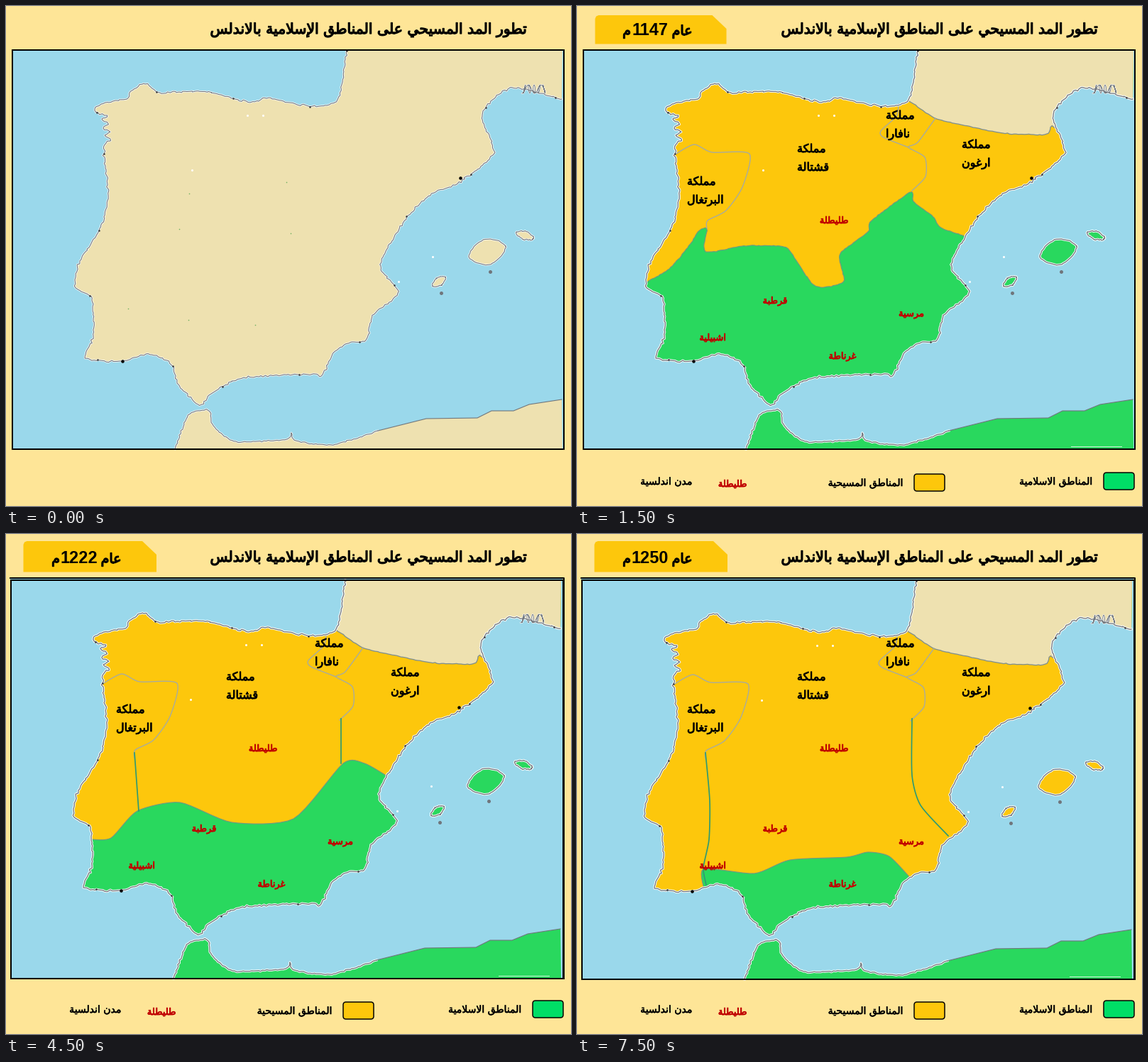
A matplotlib script that plays this animation: 796x704 px, repeating every 8000 ms.

```python
import numpy as np
import matplotlib.pyplot as plt
from matplotlib.animation import FuncAnimation
from matplotlib.patches import FancyBboxPatch, Polygon, Rectangle
from matplotlib.patheffects import withStroke

W, H, DPI = 796, 704, 100
PX = 72 / DPI
PAPER, SEA, SAND = "#fee597", "#9ad8eb", "#eee1b0"
GOLD, GREEN, RED = "#fdc70c", "#29d85e", "#c00000"
GREY, TEAL = "#70767c", "#2f9a72"

# Arabic shaping: isolated, final, initial and medial glyphs follow each other.
RIGHT_ONLY = "اةدذرزوى"
GLYPHS, code = {}, 0xFE8D
for letter in "ابةتثجحخدذرزسشصضطظعغفقكلمنهوىي":
    GLYPHS[letter] = code
    code += 2 if letter in RIGHT_ONLY else 4
GLYPHS.update({"\ufef9": 0xFEF9, "\ufefb": 0xFEFB})
RIGHT_ONLY += "\ufef9\ufefb"


def arabic(text):
    text = text.replace("لإ", "\ufef9").replace("لا", "\ufefb")
    out = []
    for i, c in enumerate(text):
        if c not in GLYPHS:
            out.append(c)
            continue
        before, after = text[max(i - 1, 0):i], text[i + 1:i + 2]
        joins_before = before in GLYPHS and before not in RIGHT_ONLY
        joins_after = after in GLYPHS and c not in RIGHT_ONLY
        out.append(chr(GLYPHS[c] + joins_before + 2 * joins_after))
    return "".join(reversed(out))


rng = np.random.default_rng(4)


def smooth(points, tension=0.35, steps=8):
    """Hermite curve through a few key points."""
    p = np.array(points, float)
    p = np.vstack([p[0], p, p[-1]])
    t = np.arange(steps)[:, None] / steps
    out = []
    for a, b, c, d in zip(p[:-3], p[1:-2], p[2:-1], p[3:]):
        start, end = tension * (c - a), tension * (d - b)
        out.append(b + t * start + t**2 * (3 * (c - b) - 2 * start - end)
                   + t**3 * (2 * (b - c) + start + end))
    return np.vstack(out + [p[-1:]])


def rough(points, amount=0.7):
    """Smooth curve, resampled every few pixels, with small irregularities."""
    p = smooth(points)
    length = np.r_[0, np.cumsum(np.hypot(*np.diff(p, axis=0).T))]
    at = np.linspace(0, length[-1], int(length[-1] / 3))
    line = np.c_[np.interp(at, length, p[:, 0]), np.interp(at, length, p[:, 1])]
    line[1:-1] += rng.normal(0, amount, line[1:-1].shape)
    return line


def island(x, y, rx, ry, tilt):
    """Tilted, slightly pointed ellipse."""
    a = np.linspace(0, 2 * np.pi, 40)
    u = rx * np.cos(a) * np.abs(np.cos(a)) ** 0.3
    v = ry * np.sin(a) * np.abs(np.sin(a)) ** 0.3
    c, s = np.cos(tilt), np.sin(tilt)
    shore = np.c_[x + c * u - s * v, y + s * u + c * v]
    shore[1:-1] += rng.normal(0, 0.5, (38, 2))
    return shore


NORTH = [(480, 63), (475, 100), (467, 133), (440, 141), (402, 137), (370, 129),
         (340, 135), (279, 120), (217, 122), (196, 109), (173, 122), (171, 130),
         (134, 138), (124, 148)]
INLETS = [(138 + i + 5 * (-1) ** i, 155 + 5.5 * i) for i in range(8)]
WEST = [(138, 205), (144, 270), (131, 318), (104, 358), (97, 394), (107, 402),
        (121, 412), (123, 465), (112, 495)]
SOUTH = [(163, 500), (200, 490), (232, 503), (244, 535), (273, 562), (290, 545),
         (333, 524), (432, 518), (444, 522), (462, 488), (485, 474), (508, 471)]
EAST = [(517, 435), (553, 404), (527, 368), (545, 328), (575, 286), (605, 261),
        (637, 250), (684, 212), (684, 190), (672, 165), (674, 145), (712, 115),
        (783, 131)]
COAST = rough(NORTH + INLETS + WEST + SOUTH + EAST)
AFRICA_WEST = rough([(238, 624), (257, 576), (286, 569), (290, 588), (309, 607),
                     (330, 614), (395, 610), (402, 600), (408, 612), (460, 618),
                     (524, 598)], 0.5)
AFRICA_EAST = np.array([(524, 598), (592, 581), (664, 580), (684, 570), (715, 570),
                        (737, 561), (783, 554)])
ISLANDS = [island(678, 346, 27, 18, -0.3), island(731, 323, 13, 6, 0.3),
           island(610, 388, 11, 6, -0.6)]

PYRENEES = rough([(467, 133), (505, 158), (555, 170), (600, 179), (660, 181),
                  (668, 169), (674, 172)], 0.3)
PORTUGAL = smooth([(138, 209), (165, 195), (190, 206), (243, 208), (233, 255),
                   (210, 288), (184, 302), (183, 314)])
NAVARRE = smooth([(453, 138), (450, 155), (428, 176), (432, 185), (467, 199)])
ARAGON = smooth([(505, 158), (480, 192), (467, 199), (490, 213), (491, 240),
                 (472, 260)])

FRONT_1147 = rough([(96, 390), (130, 370), (160, 335), (170, 318), (183, 313),
                    (181, 346), (235, 338), (285, 338), (300, 345), (335, 394),
                    (376, 388), (370, 350), (410, 318), (414, 303), (470, 262),
                    (474, 276), (500, 295), (512, 312), (549, 325)], 0.3)
FRONT_1222 = smooth([(120, 430), (148, 428), (185, 390), (245, 378), (318, 406),
                     (405, 401), (475, 323), (505, 323), (537, 341)])
FRONT_1250 = smooth([(182, 510), (178, 472), (250, 478), (300, 459), (380, 455),
                     (410, 448), (440, 454), (471, 486)])

# year, map offset, front line, later borders, island colour
PHASES = [
    (None, (0, 0), None, [], SAND),
    ("1147", (0, 0), FRONT_1147, [], GREEN),
    ("1222", (-2, 2), FRONT_1222,
     [[(181, 308), (183, 335), (187, 390)], [(472, 260), (472, 323)]], GREEN),
    ("1250", (-2, 3), FRONT_1250,
     [[(181, 308), (187, 375), (186, 430), (178, 470), (182, 494)],
      [(472, 260), (472, 340), (484, 382), (523, 425)]], GOLD),
]
STARTS = [0, 3, 9, 15]

KINGDOMS = [("نافارا", 435, 159), ("ارغون", 542, 200), ("قشتالة", 310, 206),
            ("البرتغال", 155, 252)]
CITIES = [("طليطلة", 362, 306), ("قرطبة", 279, 419), ("مرسية", 471, 437),
          ("اشبيلية", 191, 471), ("غرناطة", 374, 497), ("طليطلة", 219, 677)]
LEGEND = [("المناطق الاسلامية", 675, 674), ("المناطق المسيحية", 407, 676),
          ("مدن اندلسية", 126, 674)]

fig = plt.figure(figsize=(W / DPI, H / DPI), dpi=DPI, facecolor=PAPER)
ax = fig.add_axes([0, 0, 1, 1])


def label(text, x, y, size, color="black", ha="center", stroke=0.9):
    ax.text(x, y, arabic(text), family="DejaVu Sans", size=size * PX, color=color,
            ha=ha, va="baseline", zorder=9,
            path_effects=[withStroke(linewidth=stroke * PX, foreground=color)])


def fill(points, color, clip=None):
    patch = ax.add_patch(Polygon(points, fc=color, ec="none"))
    if clip:
        patch.set_clip_path(clip)
    return patch


def line(points, color, width, z=3):
    x, y = np.transpose(points)
    ax.plot(x, y, color=color, lw=width * PX, zorder=z)


def dots(points, color, size):
    x, y = np.transpose(points)
    ax.scatter(x, y, s=(size * PX) ** 2, color=color, lw=0, zorder=5)


def draw_regions(land, front, borders, shift):
    region = np.vstack([[(50, 50), (50, front[0, 1])], front,
                        [(620, front[-1, 1] + 15), (800, 300), (800, 50)]])
    fill(region, GOLD, land)
    france = np.vstack([PYRENEES, [(790, 165), (790, 50), (460, 50)]])
    fill(france + shift, SAND, land)
    for border in (PYRENEES, PORTUGAL, NAVARRE, ARAGON):
        line(border + shift, "#a5aaa5", 1.3)
    ax.lines[0].set_color("#7f8f8f")
    line(front, "#6f9a80", 1.2)
    ax.lines[-1].set_clip_path(land)
    for border in borders:
        line(smooth(border), TEAL, 1.7)


def draw_map(offset, front, borders, island_color):
    shift = np.array(offset)
    ruled = front is not None
    ground = GREEN if ruled else SAND
    land = fill(np.vstack([COAST, [(784, 63)]]) + shift, ground)
    if ruled:
        draw_regions(land, front, borders, shift)
        line([(696, 620) + shift, (767, 620) + shift], "#c9f5d5", 1)
    fill(np.vstack([AFRICA_WEST, AFRICA_EAST, [(784, 624)]]) + shift, ground)
    for shore in ISLANDS:
        fill(shore + shift, island_color)

    halo, ink = (3.2, 1.3) if ruled else (2.6, 1.1)
    for shore in [COAST, AFRICA_WEST] + ISLANDS:
        line(shore + shift, "white", halo)
        line(shore + shift, GREY, ink, 4)
    line(AFRICA_EAST + shift, GREY, 1.1)

    t = np.linspace(0, 1, 60)
    lagoon = np.c_[727 + 34 * t + 3 * np.sin(31 * t), 117 + 6 * np.cos(43 * t)]
    line(lagoon + shift, "white", 2)
    line(lagoon + shift, GREY, 0.9, 4)
    dots(COAST[::37] + shift, "#333333", 2.5)
    dots([(640, 242) + shift, (164, 500) + shift], "black", 4.5)
    dots([(682, 374) + shift, (613, 404) + shift], GREY, 5)
    dots([(340, 154) + shift, (362, 154) + shift, (262, 231) + shift,
          (601, 353) + shift, (553, 388) + shift], "white", 3)
    if not ruled:
        specks = np.random.default_rng(7).uniform((170, 180), (460, 480), (7, 2))
        dots(specks, "#6fb060", 1.6)


def legend_box(x, y, color):
    ax.add_patch(FancyBboxPatch((x, y), 43, 24, fc=color, ec="black", lw=1.5 * PX,
                                boxstyle="round,pad=0,rounding_size=4"))


def draw_frame(moved, bottom):
    left, top, right = (7, 65, 785) if moved else (9, 62, 786)
    if moved:
        line([(6, 62), (786, 62), (786, bottom)], "black", 2, 7)
    ax.add_patch(Rectangle((left, top), right - left, bottom - top, fc="none",
                           ec="black", lw=2 * PX, zorder=7))


def draw_tag(year, moved):
    left, top, right = (24.5, 10, 212) if moved else (25.5, 13, 210.5)
    fill([(left, top + 5), (left + 1.5, top + 1.5), (left + 5, top),
          (right - 20, top), (right, top + 19), (right, 53.5), (left, 53.5)], GOLD)
    label("عام", 148, 41, 19, stroke=1.3)
    label("م", 70, 41, 19, stroke=1.3)
    ax.text(102.5, 41, year, family="Liberation Sans", size=23.5 * PX,
            weight="bold", ha="center")


def update(frame):
    ax.clear()
    ax.set(xlim=(0, W), ylim=(H, 0))
    ax.axis("off")
    year, offset, front, borders, island_color = PHASES[
        sum(frame >= start for start in STARTS) - 1]
    moved = offset[0] != 0
    bottom = 624 + offset[1]
    ax.add_patch(Rectangle((8 + offset[0], 62), 778, bottom - 62, fc=SEA, ec="none"))
    draw_map(offset, front, borders, island_color)
    draw_frame(moved, bottom)
    label("تطور المد المسيحي على المناطق الإسلامية بالاندلس", 511.5, 39, 20.4,
          stroke=1.3)
    if not year:
        return
    draw_tag(year, moved)
    legend_box(742, 657, "#00de66")
    legend_box(475, 659, GOLD)
    for name, x, y in KINGDOMS:
        label("مملكة", x, y, 16, ha="left")
        label(name, x, y + 26, 16, ha="left")
    for item in CITIES:
        label(*item, 13, RED)
    for item in LEGEND:
        label(*item, 14, stroke=0.6)


anim = FuncAnimation(fig, update, frames=16, interval=500, repeat=True,
                     repeat_delay=0)
plt.show()
```
